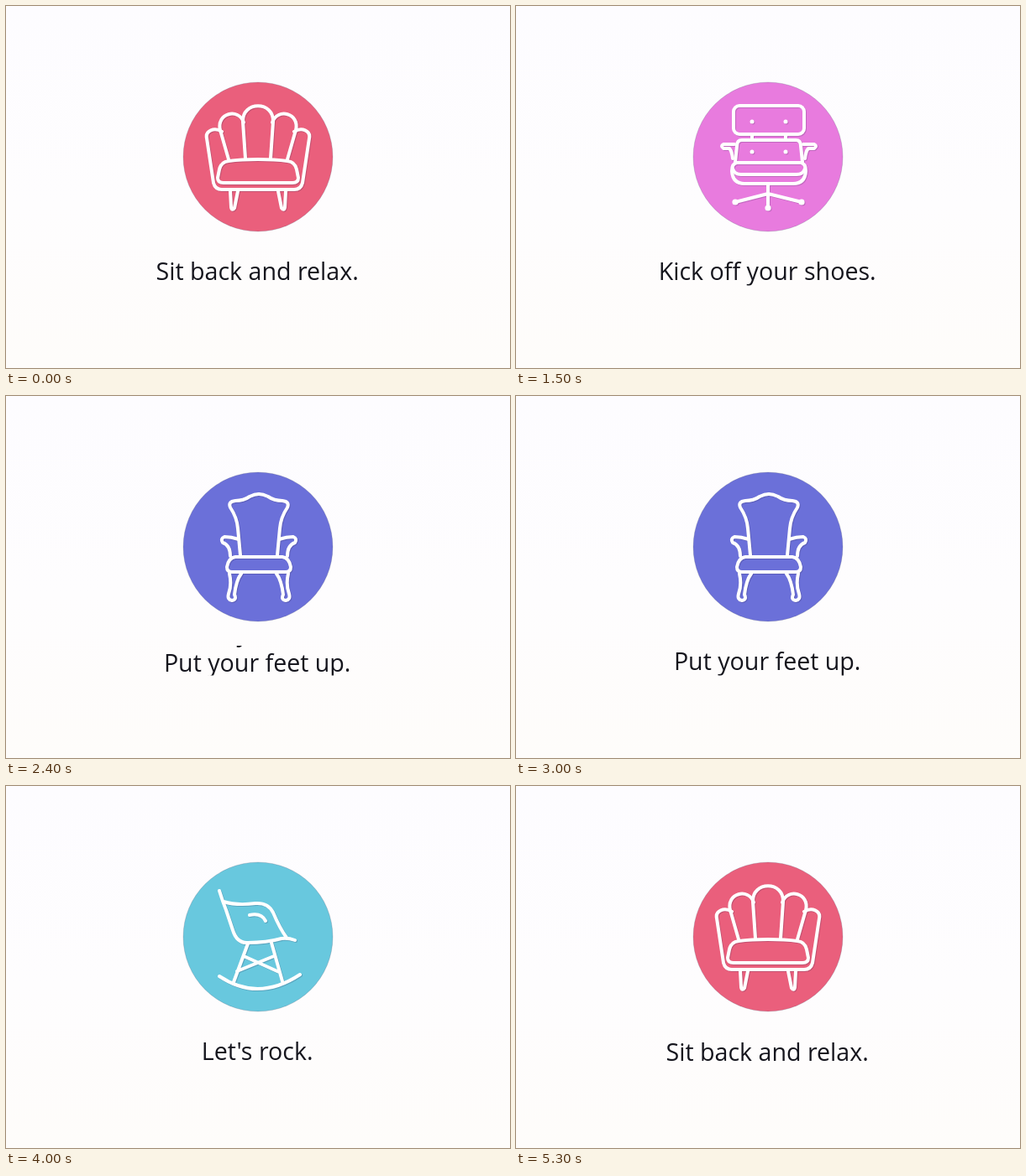
These frames come from a looping animation (600x432 px, 5.4 s). An HTML page:

```html
<!DOCTYPE html>
<html lang="en">
<head>
<meta charset="utf-8">
<title>Chairs</title>
<style>
  html, body { margin: 0; width: 100%; height: 100%; overflow: hidden; background: #fefdfe; }
  svg { display: block; width: 100vw; height: 100vh; }
  text { font: 28.6px "Open Sans", "Noto Sans", sans-serif; fill: #15151d; text-anchor: middle; }
  .chair { fill: none; stroke: #fff; stroke-width: 4; stroke-linecap: round; stroke-linejoin: round;
    filter: drop-shadow(1px 1px .6px rgba(40, 30, 70, .2)); }
  .dot { fill: #fff; stroke: none; }
</style>
</head>
<body>
<svg viewBox="0 0 600 432" xmlns="http://www.w3.org/2000/svg">
  <defs>
    <linearGradient id="bg" x2="0" y2="1">
      <stop offset="0" stop-color="#fdfcff"/>
      <stop offset=".55" stop-color="#fefdfe"/>
      <stop offset="1" stop-color="#fefcfa"/>
    </linearGradient>
    <clipPath id="disc"><circle cx="300" cy="180" r="89"/></clipPath>
    <clipPath id="line"><rect x="100" y="298" width="400" height="35.5"/></clipPath>
  </defs>
  <rect width="600" height="432" fill="url(#bg)"/>
  <circle id="fill" cx="300" cy="180" r="89" stroke="#555a70" stroke-opacity=".3" stroke-width=".8"/>
  <g id="icons" clip-path="url(#disc)"></g>
  <g id="captions" clip-path="url(#line)"></g>
</svg>
<script>
const PERIOD = 1350, START = 550, MOVE = 300;
const SLIDE = 180, ROLL = 35.5, BASELINE = 326.5;

const path = d => `<path d="${d}"/>`;
const dot = (x, y, r) => `<circle class="dot" cx="${x}" cy="${y}" r="${r}"/>`;
// Draws a part together with its mirror image about x = axis.
const pair = (axis, part) => part + `<g transform="matrix(-1 0 0 1 ${2 * axis} 0)">${part}</g>`;

const scenes = [
  {
    color: [234, 95, 124],
    text: "Sit back and relax.",
    art: path("M285 182L282 138C281 113 319 113 318 138L315 182") +
      pair(300,
        path("M265 183L255 148C250 128 277 121 283 139") +
        path("M257 150C248 144 237 149 239 158L247 211Q249 219 257 219H300") +
        path("M267 221L268 240Q269 245 272 241L276 221") +
        path("M300 183Q280 183 265 185Q256 186 254 195L252 205Q252 211 259 211H300"))
  },
  {
    color: [232, 123, 222],
    text: "Kick off your shoes.",
    art: '<rect x="259" y="119" width="84" height="34" rx="7"/>' +
      pair(301,
        path("M281 154V159") + dot(281, 138, 2.5) + dot(281, 174, 2.5) +
        path("M301 160H269Q263 160 263 167L261 186") +
        path("M260 165H247Q243 167 247 170H254Q257 173 258 182") +
        path("M301 187H263Q257 188 257 197Q258 212 272 212H301") +
        path("M258 194Q260 201 268 201H301")) +
      path("M300 213V240M261 234L300 224L340 234") +
      dot(261, 234, 3.6) + dot(340, 234, 3.6) + dot(300, 241, 3.6)
  },
  {
    color: [107, 112, 217],
    text: "Put your feet up.",
    art: pair(301,
      path("M279 190L276 158Q275 145 267 133Q264 126 273 125Q283 125 290 120Q296 117 301 117") +
      path("M277 171Q268 168 260 168Q255 170 258 175Q267 178 267 191") +
      path("M301 192H273Q265 193 263 204Q263 210 269 210H301") +
      path("M266 212Q269 225 265 236Q263 243 269 244Q275 243 272 237Q274 220 280 212"))
  },
  {
    color: [104, 200, 222],
    text: "Let's rock.",
    art: path("M254 125Q258 138 262 148L270 172Q275 188 288 187Q310 187 328 182Q336 181 344 184") +
      path("M259 138Q275 143 297 140Q312 139 318 151Q326 170 334 181") +
      path("M290 154Q304 151 309 161") +
      path("M288 188L271 234M316 187L329 233M283 203L325 222M319 203L275 221") +
      path("M254 227Q300 258 350 225")
  }
];

const byId = id => document.getElementById(id);
byId("icons").innerHTML = scenes.map(s => `<g><g class="chair">${s.art}</g></g>`).join("");
byId("captions").innerHTML = scenes.map(s => `<text x="299.2">${s.text}</text>`).join("");
const icons = [...byId("icons").children];
const captions = [...byId("captions").children];

const clamp = v => Math.min(1, Math.max(0, v));
const ease = v => (1 - Math.cos(Math.PI * clamp(v))) / 2;

function draw(ms) {
  const t = ms % (PERIOD * scenes.length);
  const now = Math.floor(t / PERIOD), next = (now + 1) % scenes.length;
  const u = t % PERIOD;
  const p = ease((u - START) / MOVE);
  // The caption stops slightly low, then settles.
  const low = 2 * p * (1 - ease((u - 1250) / 50));

  scenes.forEach((s, i) => {
    const shown = i === now || i === next;
    const place = i === now ? -p : 1 - p;
    icons[i].style.display = captions[i].style.display = shown ? "" : "none";
    icons[i].setAttribute("transform", `translate(${place * SLIDE} 0)`);
    captions[i].setAttribute("y", BASELINE + place * ROLL + low);
  });

  const from = scenes[now].color, to = scenes[next].color;
  const mix = from.map((c, i) => Math.round(c + (to[i] - c) * p));
  byId("fill").setAttribute("fill", `rgb(${mix})`);
}

const begin = performance.now();
function tick() {
  draw(performance.now() - begin);
  requestAnimationFrame(tick);
}
tick();
</script>
</body>
</html>
```
